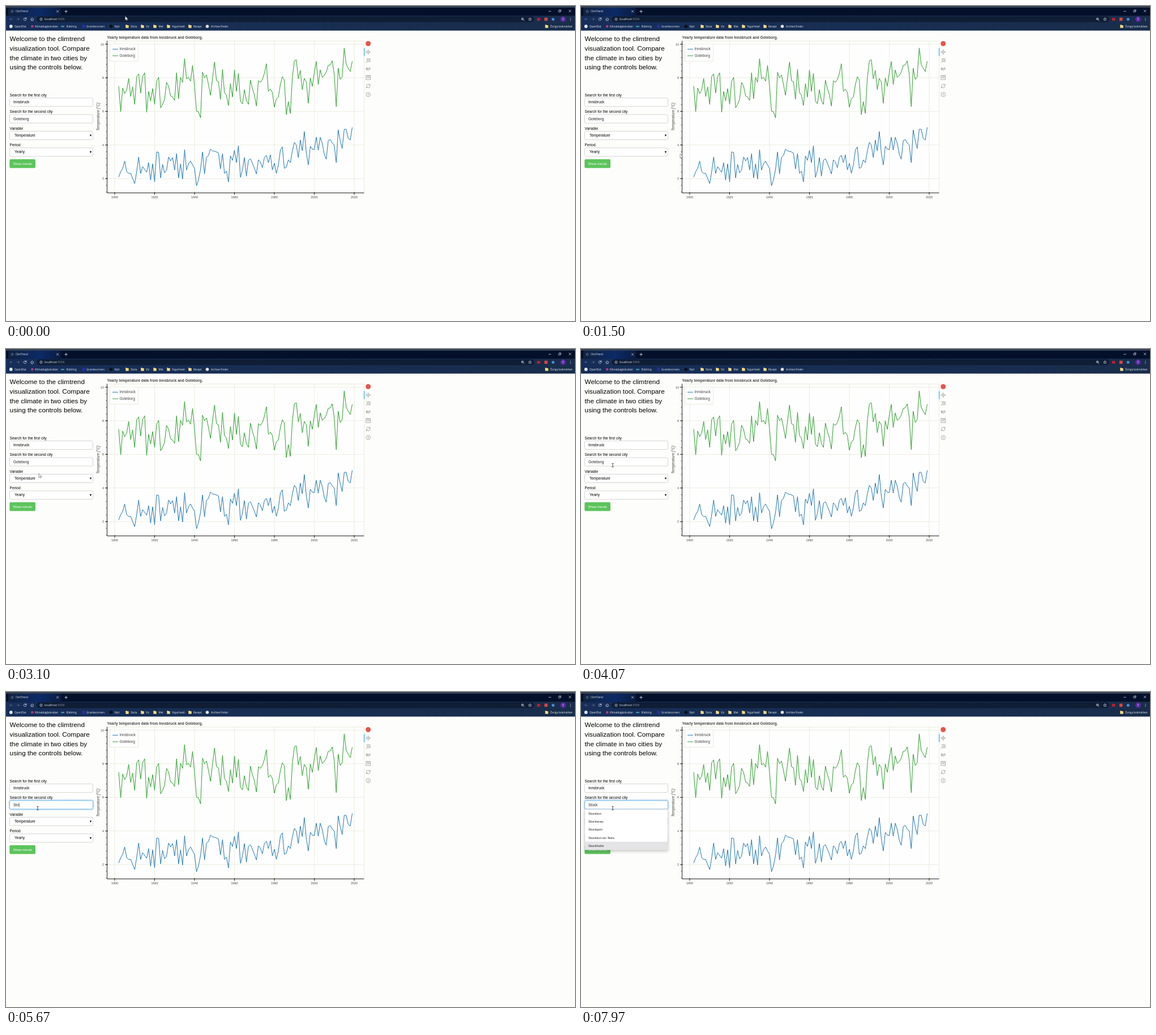
These frames come from a looping animation (1005x557 px, 8000 ms). An HTML page:

```html
<!DOCTYPE html>
<html lang="en">
<head>
<meta charset="utf-8">
<title>ClimTrend</title>
<style>
  html, body { margin: 0; width: 100%; height: 100%; overflow: hidden; background: #fdfdfb; }
  svg { display: block; font-family: "Liberation Sans", Arial, sans-serif; font-size: 6.55px; }
  .ui { font-family: "Open Sans", "Noto Sans", sans-serif; font-size: 4.6px; fill: #e9edf4; }
  .line { fill: none; stroke-linejoin: round; stroke-linecap: round; }
</style>
</head>
<body>
<svg id="stage" width="1005" height="557" viewBox="0 0 1005 557">
  <defs>
    <linearGradient id="tab"><stop stop-color="#102240"/><stop offset=".6" stop-color="#0c2a66"/><stop offset="1" stop-color="#0a1c40"/></linearGradient>
    <linearGradient id="bar"><stop stop-color="#162e58"/><stop offset="1" stop-color="#192d4b"/></linearGradient>
    <filter id="shadow" x="-10%" y="-10%" width="120%" height="125%"><feDropShadow dx="0" dy="2.5" stdDeviation="2.5" flood-opacity=".22"/></filter>
  </defs>
  <g id="still"></g>
  <g id="field"></g>
  <g id="menu"></g>
  <path id="arrow" d="M0 0V7.2L1.7 5.7L2.8 8.1L4 7.5L2.9 5.2H5.2Z" fill="#fff" stroke="#333" stroke-width=".5"/>
  <path id="beam" d="M-1.8 -3.2Q0 -3.2 0 -2.3Q0 -3.2 1.8 -3.2M0 -2.3V2.3M-1.8 3.2Q0 3.2 0 2.3Q0 3.2 1.8 3.2" fill="none" stroke="#222" stroke-width=".8"/>
</svg>
<script>
const el = id => document.getElementById(id);
const rect = (x, y, w, h, fill, more = '') => `<rect x="${x}" y="${y}" width="${w}" height="${h}" fill="${fill}" ${more}/>`;
const text = (x, y, s, more = '') => `<text x="${x}" y="${y}" ${more}>${s}</text>`;
const ui = (x, y, s, more = '') => text(x, y, s, 'class="ui" ' + more);
const line = (d, color, width = 1) => `<path class="line" d="${d}" stroke="${color}" stroke-width="${width}"/>`;
const dot = (x, y, r, fill) => `<circle cx="${x}" cy="${y}" r="${r}" fill="${fill}"/>`;
const ring = (x, y, r, color, width = .7) => `<circle cx="${x}" cy="${y}" r="${r}" fill="none" stroke="${color}" stroke-width="${width}"/>`;
const box = (y, stroke = '#ccc', more = '') => rect(6.5, y, 147, 15, '#fff', `rx="2" stroke="${stroke}" stroke-width=".8" ${more}`);

function browser() {
  const pale = '#e4e9f2', dim = '#5c6d8b';
  const folder = x => rect(x - 2.7, 34, 5.4, 4.8, '#f7dc7c', 'rx=".6"') + rect(x - 2.7, 33.2, 2.6, 1.4, '#f7dc7c');
  let s = rect(0, 0, 1005, 17.5, '#04102a') + rect(0, 0, 1005, 3, '#354353') +
    rect(0, 17, 1005, 26.5, 'url(#bar)') + rect(4, 3, 93, 15, 'url(#tab)', 'rx="2"') +
    rect(54, 18.3, 879, 10.2, '#0f1d35', 'rx="5"');
  s += ring(11, 9.5, 2, '#8794aa', .6) + line('M9.8 10.7L12.2 8.3', '#8794aa', .5) + ui(17, 11.2, 'ClimTrend') +
    line('M89.4 7.8l3.4 3.4m0-3.4l-3.4 3.4', pale, .7) + line('M103.8 9.6h4.6m-2.3-2.3v4.6', pale, .8) +
    line('M11.2 23.3H6.8m2-2l-2 2l2 2', dim, .8) + line('M19.2 23.3h4.4m-2-2l2 2l-2 2', dim, .8) +
    line('M35.7 22.3a2.3 2.3 0 1 0 .1 1.8M35.9 20.8v1.7h-1.7', pale, .8) +
    line('M43.7 23.4l2.5-2.3l2.5 2.3M44.5 23v2.8h3.4V23', pale, .7) +
    ring(62, 23.4, 2.2, pale, .6) + line('M62 23.2v1.3m0-2.5v.1', pale, .6) +
    ui(68, 25.3, 'localhost<tspan fill="#8793a8">:5006</tspan>', 'style="font-size:5.25px"');
  s += line('M958.6 9.3h3.8', pale, .7) + line('M976.3 7.9h2.8v2.8h-2.8zM977.3 7.6v-.8h2.8v2.8h-.8', pale, .6) +
    line('M994.3 7l3.6 3.6m0-3.6l-3.6 3.6', pale, .7) + ring(912.2, 22.8, 1.8, pale) + line('M913.6 24.2l1.5 1.5M911.4 22.8h1.6', pale, .8) +
    line('M925.5 20.8l.8 1.7l1.9.2l-1.4 1.2l.4 1.9l-1.7-1l-1.7 1l.4-1.9l-1.4-1.2l1.9-.2z', pale, .6) +
    rect(938, 21, 5.4, 5, '#b5202d') + rect(951, 20.6, 5.6, 5.6, '#d9453c') + dot(966.3, 23.4, 2.5, '#3f8fd8') +
    dot(984, 23.4, 4.8, '#5d2aa5') + ui(984, 25, 'E', 'text-anchor="middle"') +
    [21.2, 23.3, 25.4].map(y => dot(997, y, .55, pale)).join('');
  s += dot(8.8, 36, 2.9, '#dfe5ec') + dot(46.3, 36, 2.3, '#b3398e') + rect(97, 35, 6, 2.4, '#3c8eae') +
    dot(137, 36, 2.9, '#2530a0') + dot(185.5, 36, 2.9, '#0c1018') + dot(355.5, 36, 2.8, '#e7e3dc') +
    [214, 241, 263, 287, 325, 955].map(folder).join('');
  const marks = { 15: 'OpenOlat', 51: 'Klimatdagboksidan', 106.5: 'Klättring', 142: 'Granitecorners', 191.5: 'Nytt', 220: 'Skola',
    247: 'Viz', 269.5: 'Met', 293: 'Yoga/medi', 331: 'Recept', 362: 'Archive Finder', 961: 'Övriga bokmärken' };
  for (const x in marks) s += ui(x, 37.7, marks[x]);
  return s;
}

function form() {
  const lines = ['Welcome to the climtrend', 'visualization tool. Compare', 'the climate in two cities by', 'using the controls below.'];
  const labels = ['Search for the first city', 'Search for the second city', 'Variable', 'Period'];
  const select = (y, s) => box(y) + text(15, y + 9.6, s) + `<path d="M147.8 ${y + 6}h3.4l-1.7 3.4z"/>`;
  return lines.map((s, i) => text(6.6, 62 + i * 16.8, s, 'font-size="11.75"')).join('') +
    labels.map((s, i) => text(6.6, 159.8 + i * 29.5, s)).join('') +
    box(162.5) + text(13, 172.1, 'Innsbruck') + select(221.4, 'Temperature') + select(250.8, 'Yearly') +
    rect(6.3, 271, 45.7, 15.6, '#5cc45c', 'rx="2"') + text(29.1, 280.9, 'Show trends', 'fill="#fff" font-size="6" text-anchor="middle"');
}

// Heights of the yearly points on the stage, 1902 to 2019.
const goteborg = [
  142, 187, 145, 155, 148, 128, 160, 143,
  174, 125, 120, 154, 125, 118, 188, 151, 168, 146,
  174, 133, 126, 180, 174, 165, 135, 142, 159, 161,
  167, 118, 164, 126, 135, 93, 129, 126, 133, 105,
  142, 186, 187, 198, 117, 127, 122, 139, 158, 128,
  99, 132, 134, 165, 112, 153, 158, 176, 137, 161,
  113, 151, 119, 168, 173, 148, 167, 174, 131, 146,
  157, 177, 132, 135, 130, 119, 102, 151, 147, 153,
  179, 164, 161, 139, 125, 131, 192, 169, 190, 128,
  97, 95, 129, 114, 148, 128, 134, 172, 127, 142,
  118, 98, 139, 113, 126, 123, 117, 105, 104, 97,
  121, 178, 110, 130, 125, 74, 103, 110, 116, 98];
const innsbruck = [
  302, 293, 287, 274, 293, 296, 296, 305,
  314, 293, 267, 296, 284, 289, 294, 277, 308, 279,
  311, 258, 259, 304, 280, 295, 290, 267, 274, 268,
  290, 261, 304, 279, 306, 254, 290, 279, 274, 281,
  287, 318, 307, 289, 258, 297, 268, 264, 253, 256,
  257, 258, 260, 288, 261, 296, 292, 311, 265, 273,
  255, 277, 247, 303, 290, 268, 301, 273, 270, 278,
  287, 297, 272, 276, 286, 268, 264, 277, 263, 290,
  278, 296, 281, 255, 249, 287, 285, 272, 277, 257,
  241, 246, 268, 237, 256, 222, 259, 281, 248, 253,
  254, 232, 255, 232, 243, 262, 271, 238, 236, 242,
  246, 277, 219, 238, 252, 218, 218, 234, 237, 215];

function chart() {
  const blue = '#1f77b4', green = '#2ca02c', grid = '#ececdf', ink = '#222', gray = '#999';
  const xOf = year => 192 + (year - 1900) * 3.525, yOf = deg => 364.6 - deg * 29.71;
  const plot = (data, color) => line('M' + data.map((y, i) => `${xOf(1902 + i).toFixed(1)} ${y}`).join('L'), color);
  let s = rect(178.5, 62, 454, 268.5, '#fefefe', `stroke="${grid}"`), ticks = '';
  for (let year = 1900; year <= 2020; year += 20) {
    const x = xOf(year);
    s += line(`M${x} 62V330`, grid);
    ticks += line(`M${x} 329.5V333.5`, ink) + text(x, 340.2, year, 'font-size="5.4" fill="#444" text-anchor="middle"');
  }
  for (let deg = 2; deg <= 10; deg += 2) {
    const y = yOf(deg);
    s += line(`M179 ${y}H632`, grid);
    ticks += line(`M175.5 ${y}H179.5`, ink) + text(173, y + 2, deg, 'font-size="5.4" fill="#444" text-anchor="end"');
  }
  for (let i = 3; i < 26; i++) ticks += line(`M176.8 ${yOf(i * .4)}H178.5`, ink, .7);
  s += plot(innsbruck, blue) + plot(goteborg, green) + line('M178.5 62V330.5H632', ink) + ticks;
  s += rect(183.5, 67, 50, 30.5, '#fff', `opacity=".95" stroke="${grid}"`) + line('M188.5 76.3h9', blue) + line('M188.5 88h9', green) +
    text(200.5, 78.4, 'Innsbruck', 'fill="#444"') + text(200.5, 90, 'Goteborg', 'fill="#444"') +
    text(178.5, 58, 'Yearly temperature data from Innsbruck and Goteborg.', 'font-size="6.5" font-weight="bold" fill="#444"') +
    text(0, 0, 'Temperature [°C]', 'transform="translate(164.5 196) rotate(-90)" font-style="italic" fill="#444" text-anchor="middle"');
  // Plot tools
  s += dot(639.7, 66.5, 4.5, '#e2574c') + rect(632, 74.5, 1.2, 14, '#26aae1') +
    line('M636 81.5h7.4M639.7 77.8v7.4M637 80.4l-1.2 1.1l1.2 1.1M642.4 80.4l1.2 1.1l-1.2 1.1M638.6 79l1.1-1.2l1.1 1.2M638.6 84l1.1 1.2l1.1-1.2', gray, .8) +
    line('M636.4 93.2h7v5.6h-3', gray, .6) + ring(640, 95.8, 2, gray, .9) + line('M638.5 97.4l-2.3 2.4', gray, 1) +
    ring(637.6, 111, 1.5, gray, .9) + ring(642, 110.7, 1.5, gray, .9) + line('M637.6 109v4.5M641 112.3l-1.2 2', gray, .8) +
    line('M636.2 122.8h7.4v7.4h-7.4zM638 122.8v2.4h3.6v-2.4M637.6 127h4.6', gray, .8) +
    line('M636.5 141a3.3 3.3 0 0 1 6.2-1M643.1 142a3.3 3.3 0 0 1-6.2 1M643 138.2v2h-2M636.5 144.8v-2h2', gray, .8) +
    ring(639.8, 156.5, 3.8, gray, .8) + text(639.8, 158.5, '?', 'font-size="5.6" font-weight="bold" fill="#999" text-anchor="middle"');
  return s;
}
el('still').innerHTML = browser() + form() + chart();

const cities = ['Stockton', 'Stoke-on-Trent', 'Stockerau', 'Stolberg', 'Stockport', 'Stourbridge', 'Stockton-on-Tees',
  'Storrs', 'Stowmarket', 'Stockholm', 'Stoughton', 'Stord'];
// Time in ms and pointer position
const path = [[0, 210.5, 18], [400, 216, 15], [800, 222, 11.5], [1150, 222, 14], [1630, 165, 315], [1950, 105, 492],
  [2170, 94.5, 457], [2480, 78, 322], [2900, 60, 235], [3300, 56, 205.5], [8000, 56, 205.5]];
const typing = [[0, 'Goteborg'], [5150, 'S'], [5350, 'St'], [5560, 'Sto'], [5900, 'Stoc'], [6150, 'Stock']];
const focusAt = 4250, selectAt = 4500, menuAt = 5690, steps = [7050, 7300, 7550, 7800];

function pointer(t) {
  const i = path.findIndex(p => p[0] > t), [t0, x0, y0] = path[i - 1], [t1, x1, y1] = path[i];
  const k = (t - t0) / (t1 - t0), e = k * k * (3 - 2 * k);
  return [x0 + (x1 - x0) * e, y0 + (y1 - y0) * e];
}

function field(t, typedAt, value) {
  const focused = t >= focusAt, selected = t >= selectAt && typedAt === 0;
  const caretOn = focused && !selected && Math.floor((t - Math.max(typedAt, focusAt)) / 530) % 2 === 0;
  let s = box(192, focused ? '#66afe9' : '#ccc', focused ? 'style="filter:drop-shadow(0 0 1.5px #66afe9)"' : '');
  if (selected) s += rect(13, 195.6, 27, 8, '#3390ff');
  s += text(13, 201.6, value, `id="value" fill="${selected ? '#fff' : '#222'}"`);
  el('field').innerHTML = s;
  if (caretOn) {
    const x = 13.4 + el('value').getComputedTextLength();
    el('field').innerHTML += line(`M${x} 196v7`, '#222', .6);
  }
}

function menu(t, value) {
  if (t < menuAt) return '';
  const list = cities.filter(c => c.startsWith(value)), row = 14.3;
  const active = steps.filter(s => t >= s).length;
  return rect(6.8, 207.5, 146.4, list.length * row, '#fff', 'stroke="#ccc" stroke-width=".6" filter="url(#shadow)"') +
    rect(7, 207.5 + active * row, 146, row, '#e4e4e6') +
    list.map((c, i) => text(13, 216.6 + i * row, c, 'font-size="5.9" fill="#222"')).join('');
}

let shown = '';
function frame(now) {
  const t = now % 8000, [typedAt, value] = typing.filter(p => p[0] <= t).pop();
  field(t, typedAt, value);
  const html = menu(t, value);
  if (html !== shown) el('menu').innerHTML = shown = html;
  const [x, y] = pointer(t), overField = x > 6 && x < 154 && y > 192 && y < 207;
  const move = `translate(${x} ${y})`;
  el('arrow').setAttribute('transform', move);
  el('beam').setAttribute('transform', move);
  el('arrow').style.display = overField ? 'none' : '';
  el('beam').style.display = overField ? '' : 'none';
  requestAnimationFrame(() => frame(performance.now()));
}
frame(0);
</script>
</body>
</html>
```
